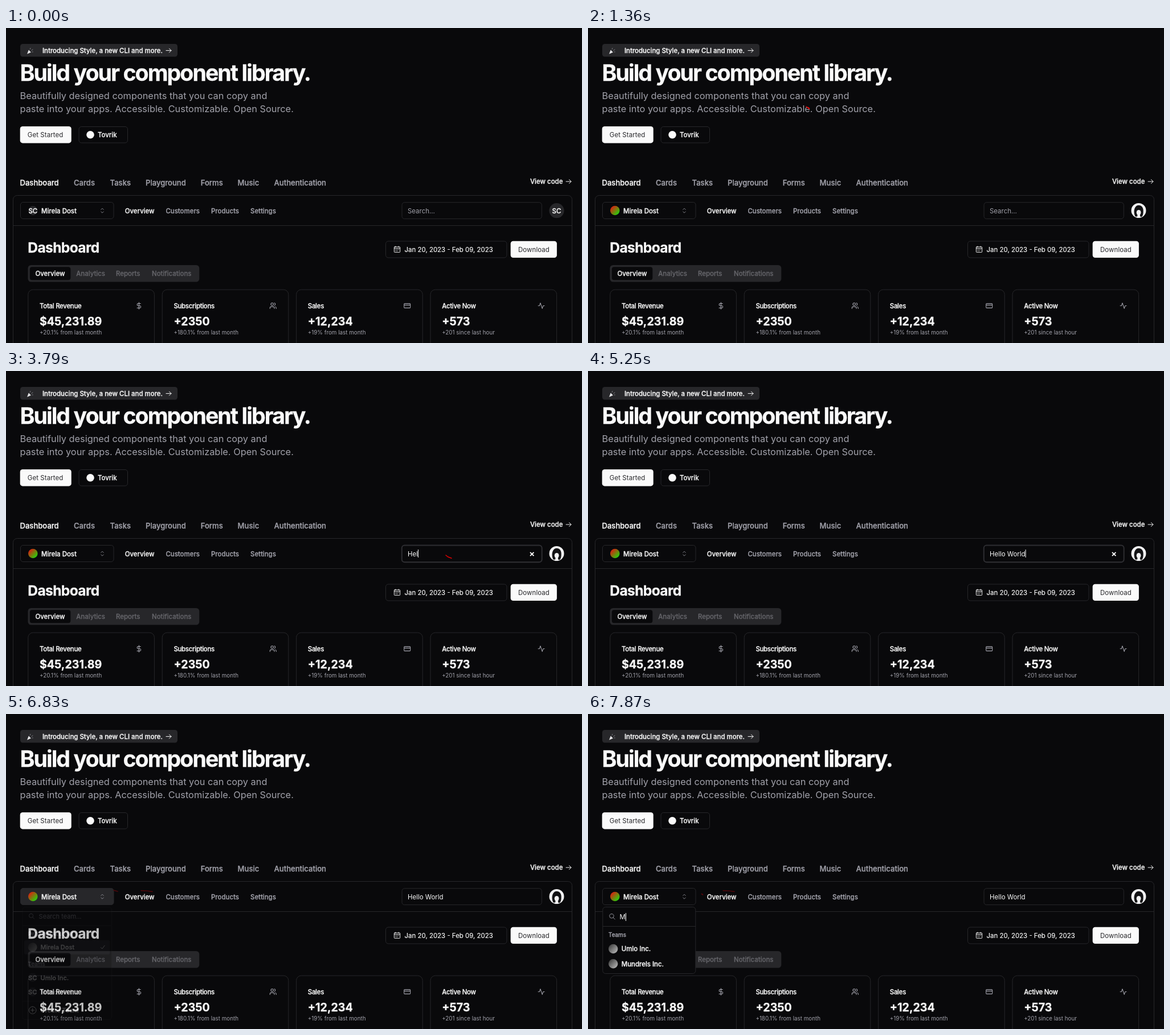
Recreate the animation shown at these times as an HTML page with a canvas. Size 1011 by 554 pixels, loop 8000 ms.

```html
<!DOCTYPE html>
<html lang="en">
<head>
<meta charset="utf-8">
<title>Component library</title>
<style>
  html, body { margin: 0; width: 100%; height: 100%; overflow: hidden; background: #09090b; }
  svg, canvas { position: absolute; left: 0; top: 0; width: 1011px; height: 554px; }
  text { font-family: Inter, "Liberation Sans", sans-serif; font-optical-sizing: none; white-space: pre; }
</style>
</head>
<body>
<svg id="stage" viewBox="0 0 1011 554"></svg>
<canvas id="ink" width="1011" height="554"></canvas>
<script>
const BG = '#09090b', LINE = '#27272a', FG = '#fafafa', MUTED = '#a1a1aa', DIM = '#646469', DARK = '#27272a';
const SM = 11.45, XS = 9.82, BASE = 13.09;
const OWNER = 'Mirela Dost';

// ---- markup helpers
// light text of medium weight and up gets a hairline stroke, as smoothed text on dark looks fuller
const text = (x, y, s, { size = SM, w = 500, c = FG, track = 0, more = '' } = {}) =>
  `<text x="${x}" y="${y}" font-size="${size}" font-weight="${w}" fill="${c}" letter-spacing="${track * size}" ${w > 400 ? `stroke="${c}" stroke-width=".28"` : ''} ${more}>${s}</text>`;
const box = (x, y, w, h, r, fill = 'none', stroke = 'none', more = '') =>
  `<rect x="${x}" y="${y}" width="${w}" height="${h}" rx="${r}" fill="${fill}" stroke="${stroke}" ${more}/>`;
const disc = (x, y, r, fill, more = '') => `<circle cx="${x}" cy="${y}" r="${r}" fill="${fill}" ${more}/>`;
const rule = (x1, x2, y) => `<path d="M${x1} ${y}H${x2}" stroke="${LINE}"/>`;
const group = (id, body, more = '') => `<g id="${id}" ${more}>${body}</g>`;
const icon = (cx, cy, d, c = MUTED, k = .547, sw = 2) =>
  `<path transform="translate(${cx} ${cy}) scale(${k}) translate(-12 -12)" d="${d}" fill="none" stroke="${c}" stroke-width="${sw}" stroke-linecap="round" stroke-linejoin="round"/>`;
const initials = (x, y, r) => disc(x, y, r, LINE) + text(x, y + 4.3, 'SC', { more: 'text-anchor="middle"' });

const ARROW = 'M3 12H21M14 5L21 12L14 19';
const ICONS = {
  dollar: 'M12 1V23M17 5H9.5A3.5 3.5 0 0 0 9.5 12H14.5A3.5 3.5 0 0 1 14.5 19H6',
  users: 'M16 21V19A4 4 0 0 0 12 15H6A4 4 0 0 0 2 19V21M9 3A4 4 0 1 0 9 11A4 4 0 1 0 9 3M22 21V19A4 4 0 0 0 19 15.1M16 3.1A4 4 0 0 1 16 10.9',
  card: 'M4 5H20A2 2 0 0 1 22 7V17A2 2 0 0 1 20 19H4A2 2 0 0 1 2 17V7A2 2 0 0 1 4 5ZM2 10H22',
  pulse: 'M22 12H18L15 21L9 3L6 12H2',
  calendar: 'M4 4H20A1.5 1.5 0 0 1 21.5 5.5V20A1.5 1.5 0 0 1 20 21.5H4A1.5 1.5 0 0 1 2.5 20V5.5A1.5 1.5 0 0 1 4 4ZM2.5 9H21.5M7 2V5M17 2V5M7 13H8M11.5 13H12.5M16 13H17M7 17H8M11.5 17H12.5',
  chevrons: 'M7.5 8.5L12 4L16.5 8.5M7.5 15.5L12 20L16.5 15.5',
  lens: 'M10 2.5A7.5 7.5 0 1 0 10 17.5A7.5 7.5 0 1 0 10 2.5M15.5 15.5L21.5 21.5',
  check: 'M5 13L10 18L19 6',
  plus: 'M12 1A11 11 0 1 0 12 23A11 11 0 1 0 12 1M12 6.5V17.5M6.5 12H17.5'
};

// ---- page sections
const hero =
  box(25, 28, 276, 22.5, 4.5, LINE) +
  `<path d="M37 45.8L39.8 38.6L44 42.8Z" fill="#e4e4e7"/><path d="M42 37.5L43.2 35M44.5 39.5L47.3 37.8M45.6 42H47.6" stroke="#8a8a90" stroke-width=".9"/>` +
  text(64, 43.6, 'Introducing Style, a new CLI and more.') + icon(285.5, 39.6, ARROW, FG, .5, 2) +
  text(24.5, 93, 'Build your component library.', { size: 39.27, w: 700, track: -.05 }) +
  ['Beautifully designed components that you can copy and', 'paste into your apps. Accessible. Customizable. Open Source.']
    .map((s, i) => text(24.5, 124.6 + 23 * i, s, { size: 16.35, w: 400, c: MUTED })).join('') +
  box(24.7, 173, 90, 29.4, 4.5, FG) + text(37.8, 192, 'Get Started', { w: 400, c: DARK, track: .008 }) +
  box(128, 173.5, 85.5, 28.5, 4.5, BG, LINE) + disc(148, 187.7, 6.8, FG) + text(161, 192, 'Tovrik');

const tabs =
  [[24.5, 'Dashboard'], [119, 'Cards'], [182.6, 'Tasks'], [245, 'Playground'], [341.7, 'Forms'], [406.6, 'Music'], [470.6, 'Authentication']]
    .map(([x, s], i) => text(x, 276.5, s, { size: BASE, c: i ? MUTED : FG })).join('') +
  text(920, 274.3, 'View code') + icon(987.5, 270, ARROW, FG, .5, 1.9);

const person =
  disc(966.5, 321, 13, '#f4f4f5') +
  '<path d="M959.5 329C957.5 323 958.5 314 964.5 312C970.5 310.3 974.3 315 974.6 320C974.9 325 974.5 329.5 972 332L960.5 331.5Z" fill="#131315"/>' +
  '<ellipse cx="966.6" cy="324.6" rx="3.9" ry="4.7" fill="#f4f4f5"/><path d="M963.6 334L964.8 327H968.6L969.6 333.5Z" fill="#f4f4f5"/>';

const topbar =
  `<path d="M12.5 560V301.5A7 7 0 0 1 19.5 294.5H986.5A7 7 0 0 1 993.5 301.5V560" fill="none" stroke="${LINE}"/>` + rule(12.5, 993.5, 347.5) +
  box(25.5, 306.5, 163.5, 29, 4.5, BG, LINE) + box(25.5, 306.5, 163.5, 29, 4.5, LINE, 'none', 'id="hover"') +
  group('fallback', initials(47.3, 321.2, 8.2) + initials(966.5, 321.2, 13.1)) +
  group('photos', disc(47.3, 321, 8.3, 'url(#warm)') + person) +
  text(62, 325.5, OWNER) + icon(169, 321.2, ICONS.chevrons, MUTED, .5, 1.6) +
  [[208.7, 'Overview'], [280.4, 'Customers'], [360, 'Products'], [429, 'Settings']]
    .map(([x, s], i) => text(x, 325.5, s, { c: i ? MUTED : FG })).join('') +
  box(695, 306.8, 245.3, 28.8, 4.5, BG, LINE) + box(694.7, 306.5, 246, 29.8, 5, 'none', '#2d2d31', 'id="ring" stroke-width="1.9"') +
  text(705, 325.5, 'Search...', { w: 400, more: 'id="query"' }) +
  box(705, 314, 1, 14, 0, FG, 'none', 'id="caret"') +
  group('clear', '<path d="M920 318.8L926.4 325.2M926.4 318.8L920 325.2" stroke="#fff" stroke-width="1.8"/>');

const stats = [
  ['Total Revenue', '$45,231.89', '+20.1% from last month', 'dollar'],
  ['Subscriptions', '+2350', '+180.1% from last month', 'users'],
  ['Sales', '+12,234', '+19% from last month', 'card'],
  ['Active Now', '+573', '+201 since last hour', 'pulse']
];
const panel =
  text(38.3, 395, 'Dashboard', { size: 24.54, w: 700, track: -.025 }) +
  box(666.5, 375, 212.5, 29, 4.5, BG, LINE) + icon(686.5, 389.3, ICONS.calendar, FG, .54, 1.7) +
  text(699.6, 393.6, 'Jan 20, 2023 - Feb 09, 2023', { w: 400, more: `stroke="${FG}" stroke-width=".15"` }) +
  box(885.7, 374.8, 81.2, 29.3, 4.5, FG) + text(899, 393.6, 'Download', { w: 400, c: DARK, track: .008 }) +
  box(38.5, 417, 300.8, 29.5, 5.5, LINE) + box(41.8, 420.3, 71.5, 23, 4, BG) +
  [[51.5, 'Overview'], [123.2, 'Analytics'], [193, 'Reports'], [256, 'Notifications']]
    .map(([x, s], i) => text(x, 436.2, s, { c: i ? DIM : FG })).join('') +
  stats.map(([title, value, note, ic], i) => {
    const x = 38.8 + 235.4 * i;
    return box(x, 460.2, 221.6, 110, 8.5, BG, LINE) + text(x + 20.2, 493, title, { track: -.025 }) +
      icon(x + 194.6, 488.5, ICONS[ic]) + text(x + 20.2, 522.8, value, { size: 19.63, w: 700 }) +
      text(x + 20.2, 539.3, note, { size: XS, w: 400, c: MUTED });
  }).join('');

const teams = ['Umlo Inc.', 'Mundrels Inc.'];
const label = (y, s) => text(36, y, s, { size: XS, c: MUTED });
const teamRows = (y, avatar) => teams.map((s, i) => avatar(44.2, y + 26.3 * i) + text(58.7, y + 4.3 + 26.3 * i, s)).join('');
const grey = (x, y) => disc(x, y, 8.2, 'url(#grey)');
const menu = group('menu',
  box(25.8, 339.5, 163, 206, 5, BG, LINE, 'id="sheet"') + rule(26, 189, 373.5) +
  icon(42.5, 356.3, ICONS.lens, MUTED, .5, 1.7) +
  text(55.6, 361.2, 'Search team...', { w: 400, more: 'id="filter"' }) +
  box(56, 350, 1, 14, 0, FG, 'none', 'id="bar"') +
  group('all',
    label(391.6, 'Personal Account') + box(29, 400, 156.3, 26.2, 3.3, LINE) + grey(44.2, 413) +
    text(58.7, 417.3, OWNER) + icon(172.3, 413, ICONS.check, FG, .5, 2) +
    label(447.4, 'Teams') +
    group('early', teamRows(468.5, (x, y) => initials(x, y, 8.2))) + group('late', teamRows(468.5, grey)) +
    rule(26, 189, 511.8) + icon(44.2, 528.3, ICONS.plus, FG, .6, 1.7) + text(58.7, 532.6, 'Create Team')) +
  group('found', label(391.6, 'Teams') + teamRows(413, grey)));

const ramp = (id, a, b) => `<linearGradient id="${id}" x1="0.1" y1="0.1" x2="0.9" y2="0.9"><stop offset="0.1" stop-color="${a}"/><stop offset="0.9" stop-color="${b}"/></linearGradient>`;
const $ = id => document.getElementById(id);
$('stage').innerHTML = '<defs>' + ramp('warm', '#d02a10', '#2fc80c') + ramp('grey', '#4c4c4c', '#a8a8a8') + '</defs>' +
  hero + tabs + topbar + panel + menu;

// ---- timing
const LOOP = 8000;
const clamp = v => Math.max(0, Math.min(1, v));
const span = (t, a, b) => clamp((t - a) / (b - a));
const easeOut = p => 1 - (1 - p) ** 2;
const easeInOut = p => p < .5 ? 2 * p * p : 1 - 2 * (1 - p) ** 2;
const within = (t, a, b) => t >= a && t < b;
const show = (id, on) => { $(id).style.visibility = on ? 'inherit' : 'hidden'; };

const PHRASE = 'Hello World';
const KEYS = [3460, 3590, 3790, 3930, 4080, 4230, 4530, 4770, 4940, 5080, 5250];

// curve: start, control, end; head and tail: travel times
const SWEEPS = [
  { curve: [[250, 0], [270, 75], [382, 139]], head: [70, 520], tail: [520, 1090] },
  { curve: [[382, 137.5], [600, 288], [780, 335]], head: [1295, 2060], tail: [2170, 2640] },
  { curve: [[769, 324], [450, 324], [188, 309]], head: [5620, 6020], tail: [5875, 6390] }
];
const MARKS = [
  [2810, 3200, '#d00000', 1.2, [[780.5, 334], [782, 329.5]]],
  [3200, 4230, '#e00000', 1.5, [[772, 324], [776, 327], [782, 329.3]]],
  [5410, 6320, '#c40000', 1.2, [[772, 323.5], [771, 328]]],
  [6390, 8000, '#4e080c', 1.6, [[237, 310.6], [247, 311], [257, 312.4]]],
  [6390, 7430, '#4e080c', 1.5, [[189, 310], [196, 312]]],
  [7430, 8000, '#5c070c', 1.8, [[199.5, 316.5], [201.5, 317.8]]]
];

const pen = $('ink').getContext('2d');
pen.lineCap = 'round';
const bend = ([a, b, c], u) => [0, 1].map(i => a[i] * (1 - u) ** 2 + 2 * b[i] * u * (1 - u) + c[i] * u * u);
function stroke(points, color, width, alpha = 1) {
  pen.globalAlpha = alpha;
  pen.strokeStyle = color;
  pen.lineWidth = width;
  pen.beginPath();
  points.forEach(p => pen.lineTo(...p));
  pen.stroke();
}

function drawTrail(t) {
  pen.clearRect(0, 0, 1011, 554);
  for (const { curve, head, tail } of SWEEPS) {
    const h = easeInOut(span(t, ...head)), l = easeOut(span(t, ...tail));
    const a = bend(curve, l), b = bend(curve, h);
    if (h <= l || Math.hypot(b[0] - a[0], b[1] - a[1]) < 5) continue;
    const n = 24;
    for (let i = 0; i < n; i++) {
      const at = j => bend(curve, l + (h - l) * j / n);
      stroke([at(i), at(i + 1)], '#e00000', .8 + 1.1 * i / n, Math.min(1, .35 + 1.6 * i / n));
    }
  }
  for (const [from, to, color, width, points] of MARKS)
    if (within(t, from, to)) stroke(points, color, width, to < LOOP ? span(t, to, to - 200) : 1);
}

function render(t) {
  const loaded = t >= 230;
  show('fallback', !loaded);
  show('photos', loaded);

  const count = KEYS.filter(k => t >= k).length;
  const query = $('query');
  query.textContent = count ? PHRASE.slice(0, count) : 'Search...';
  query.setAttribute('fill', count ? FG : MUTED);
  show('ring', within(t, 2640, 6660));
  show('clear', within(t, 3460, 6660));
  show('caret', within(t, 2640, 3190) || within(t, 3460, 5750) || within(t, 6250, 6660));
  $('caret').setAttribute('x', 705 + (count ? query.getComputedTextLength() : 0));

  $('hover').style.opacity = span(t, 5900, 6020) * (1 - span(t, 6850, 6990));

  const open = t < 6820 ? 0 : easeOut(span(t, 6815, 6950));
  const k = .95 + .05 * open;
  show('menu', open > 0);
  $('menu').style.opacity = open;
  $('menu').setAttribute('transform', `translate(107 339) scale(${k}) translate(-107 -339)`);
  const typed = t >= 7670;
  $('sheet').setAttribute('height', typed ? 117 : 206);
  const filter = $('filter');
  filter.textContent = typed ? 'M' : 'Search team...';
  filter.setAttribute('fill', typed ? FG : MUTED);
  $('bar').setAttribute('x', typed ? 55.6 + filter.getComputedTextLength() : 56);
  show('bar', t >= 7290);
  show('all', open > 0 && !typed);
  show('early', open > 0 && !typed && t < 6980);
  show('late', open > 0 && !typed && t >= 6980);
  show('found', typed);

  drawTrail(t);
}

const start = performance.now();
function tick() {
  render((performance.now() - start) % LOOP);
  requestAnimationFrame(tick);
}
tick();
</script>
</body>
</html>
```
